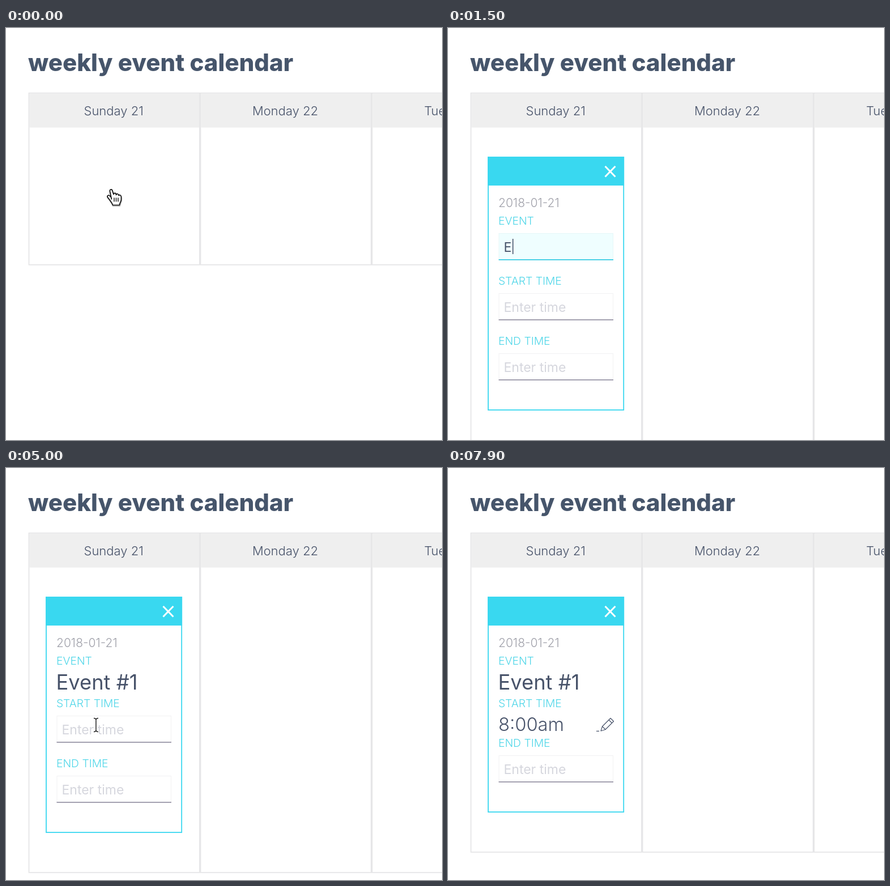
Animation of 770x727 px, one loop 8 s. Source, as an HTML page:

```html
<!DOCTYPE html>
<html lang="en">
<head>
<meta charset="utf-8">
<title>Weekly event calendar</title>
<style>
  html, body { margin: 0; width: 100%; height: 100%; overflow: hidden; background: #fff; }
  svg { display: block; font-family: Inter, "Open Sans", sans-serif; }
</style>
</head>
<body>
<svg id="stage" width="770" height="727" viewBox="0 0 770 727"></svg>
<script>
const LOOP = 8000;
const CYAN = '#39d8f0', INK = '#48536a', LINE = '#e5e5e7';
const OPEN = 100, EVENT_SAVED = 3900, START_SAVED = 7500;

// [time, typed text]
const eventKeys = [[1400, 'E'], [1700, 'Ev'], [1800, 'Eve'], [1900, 'Even'], [2300, 'Event'],
  [3000, 'Event '], [3300, 'Event #'], [3700, 'Event #1']];
const startKeys = [[5700, '8'], [6100, '8:'], [6500, '8:0'], [6700, '8:00'], [7100, '8:00a'], [7300, '8:00am']];

const stage = document.getElementById('stage');
const pen = document.createElement('canvas').getContext('2d');
pen.font = '23px Inter, "Open Sans", sans-serif';

const within = (t, from, to) => t >= from && t < to;
const typed = (keys, t) => keys.reduce((text, [at, s]) => t >= at ? s : text, '');
const rect = (x, y, w, h, fill, more = '') =>
  `<rect x="${x}" y="${y}" width="${w}" height="${h}" fill="${fill}" ${more}/>`;
const text = (s, x, y, size, fill = INK, weight = 400) =>
  `<text x="${x}" y="${y}" font-size="${size}" fill="${fill}" font-weight="${weight}" xml:space="preserve">${s}</text>`;
const path = (d, stroke, width, more = 'fill="none"') =>
  `<path d="${d}" stroke="${stroke}" stroke-width="${width}" ${more}/>`;
const label = (s, y) => text(s, 89, y, 19.3, '#4fd6e8', 300);

function field(y, hint, value = '', focus = false, caret = false) {
  const caretX = 100 + (value ? pen.measureText(value).width : 0);
  return rect(90, y + .5, 201.5, 46, focus ? '#effeff' : '#fff', `stroke="${focus ? '#e6f6f8' : '#f1f1f3'}"`) +
    rect(89.5, y + 46, 202.5, 1.8, focus ? '#3bcce4' : '#9a97a8') +
    text(value || hint, 98.5, y + 33, 23, value ? INK : '#d6d7de') +
    (caret ? rect(caretX, y + 10, 1.6, 27, INK) : '');
}

function pencil(y) {
  return `<g transform="translate(0 ${y})" stroke-linejoin="round">` +
    path('M270 24L272.5 16L287 1.5L292.5 7L278 21.5ZM272.5 16L278 21.5M284 4.500L289.500 10M262 24.3H267', INK, 1.2) + '</g>';
}

function hand(x, y) {
  const d = 'M8 18L5 4C4 0 8.500 -1 9.500 3L11.500 9C12 6 16 6 16 10C17 7 20.500 8 20.500 11' +
    'C22 9 25 10.500 25 14V18C25 22 22.500 23 22 28H10C9 24 6 21 4 18L.8 14C-.5 11 3 9.500 5 12L7.500 14.500';
  return `<g transform="translate(${x - 7.5} ${y - .5})" stroke-linejoin="round">` +
    `<g transform="translate(.5 1.500)" opacity=".25">${path(d, '#000', 2.4, 'fill="#000"')}</g>` +
    path(d, '#111', 1.7, 'fill="#fff"') +
    path('M12.500 15V22M16 15V22M19.500 15V22', '#111', 1.4) + '</g>';
}

const beam = (x, y) => path(`M${x - 4} ${y - 12}Q${x} ${y - 12} ${x} ${y - 9}V${y + 9}Q${x} ${y + 12} ${x - 4} ${y + 12}` +
  `M${x + 4} ${y - 12}Q${x} ${y - 12} ${x} ${y - 9}M${x} ${y + 9}Q${x} ${y + 12} ${x + 4} ${y + 12}`, '#222', 1.5);

function calendar(bottom) {
  const h = bottom - 114;
  let out = text('weekly event calendar', 39, 76, 42, '#46556b', 800);
  [[40, 'Sunday 21', 137.5], [343, 'Monday 22', 435], [646, 'Tuesday 23', 738.5]].forEach(([x, day, dx]) => {
    out += rect(x + .5, 114.8, 301.5, h, '#fff', `stroke="${LINE}" stroke-width="1.8"`) +
      rect(x + 1.3, 115.6, 300, 60, '#efefef') + text(day, dx, 153.5, 22, INK, 300);
  });
  return out;
}

function card(t) {
  const savedEvent = t >= EVENT_SAVED, savedStart = t >= START_SAVED;
  const startY = savedEvent ? 422 : 453;
  const endY = startY + (savedStart ? 70 : 106);
  const bottom = endY + 115;
  let out = rect(71, 228, 239.2, bottom - 228, '#fff', `stroke="${CYAN}" stroke-width="1.8"`) +
    rect(70.1, 227, 241, 51, CYAN) +
    path('M277.500 244L295.500 262.500M295.500 244L277.500 262.500', '#fff', 3) +
    text('2018-01-21', 89, 316, 21, '#a0a1aa', 300) + label('EVENT', 347);

  if (savedEvent) {
    out += text('Event #1', 88.5, 391, 36.3);
    if (t < 4700) out += pencil(364);
  } else {
    const caret = within(t, 800, 1100) || (t >= 1400 && !within(t, 2900, 3000));
    out += field(362, 'Enter name', typed(eventKeys, t), t >= 800, caret);
  }

  out += label('START TIME', startY);
  if (savedStart) {
    out += text('8:00am', 89, 463.5, 32.7, INK, 300) + pencil(440);
  } else {
    const focus = t >= 5200;
    out += field(startY + 15, 'Enter time', typed(startKeys, t), focus, focus && !within(t, 5500, 5700));
  }
  return out + label('END TIME', endY) + field(endY + 15, 'Enter time');
}

function pointer(t) {
  const glide = (from, to, a, b) => {
    const k = Math.min(1, Math.max(0, (t - a) / (b - a))), e = k * k * (3 - 2 * k);
    return from.map((v, i) => v + (to[i] - v) * e);
  };
  if (t < 1400) {
    const [x, y] = glide([186, 285], [165, 386], 250, 750);
    return y > 362 ? beam(x, y) : hand(x, y);
  }
  if (within(t, 4500, 5700)) {
    const [x, y] = glide([165, 386], [158, 464], 4500, 5150);
    return y > 437 ? beam(x, y) : hand(x, y);
  }
  return '';
}

function draw(now) {
  const t = now % LOOP;
  const bottom = t < OPEN ? 417 : t < EVENT_SAVED ? 744 : t < START_SAVED ? 713 : 677;
  stage.innerHTML = calendar(bottom) + (t < OPEN ? '' : card(t)) + pointer(t);
}

const begin = performance.now();
function tick() {
  draw(performance.now() - begin);
  requestAnimationFrame(tick);
}
tick();
</script>
</body>
</html>
```
